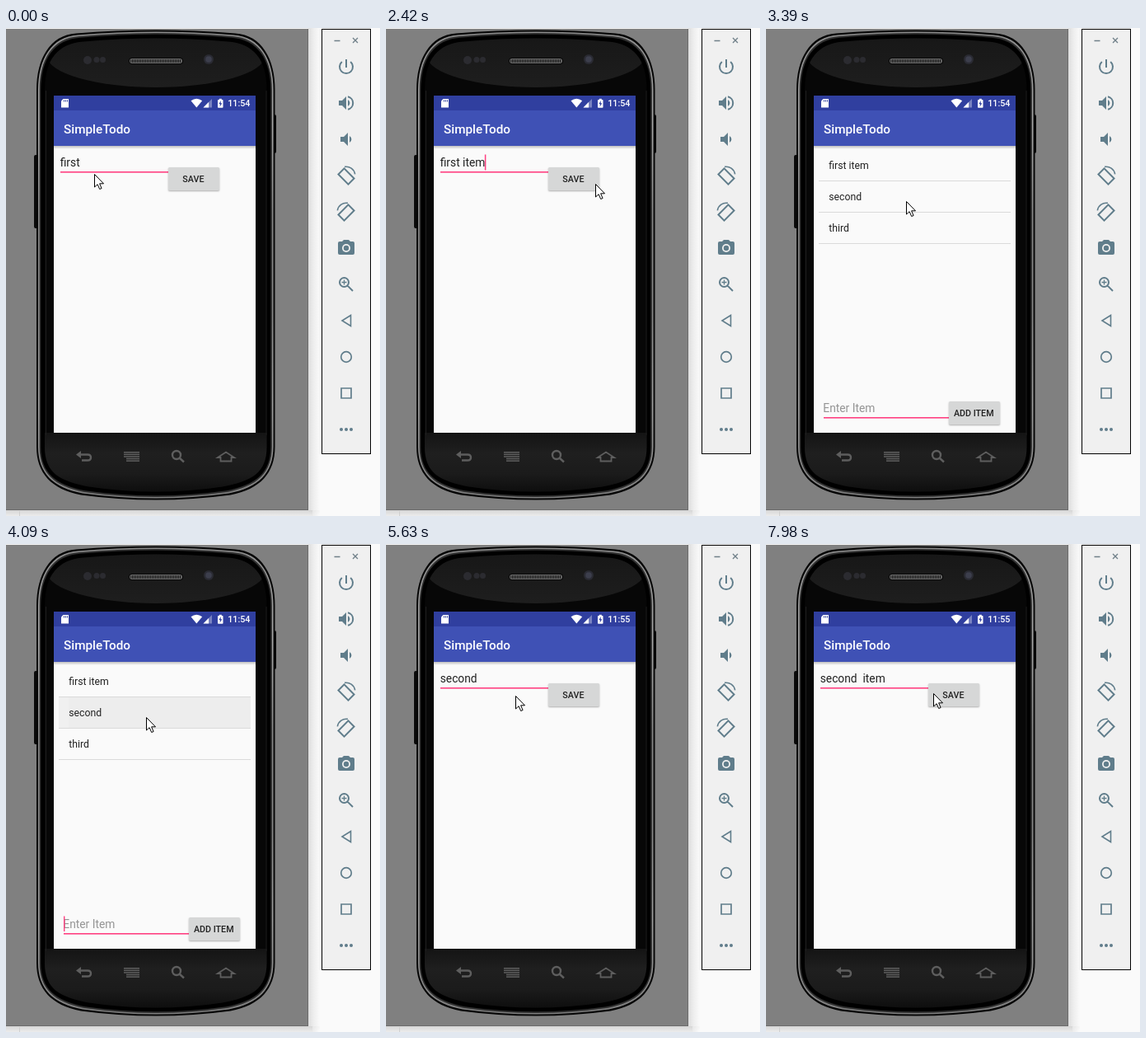
These frames come from a looping animation (454 px wide and 592 px high, 8000 ms). An HTML page with a canvas:

```html
<!DOCTYPE html>
<html lang="en">
<head>
<meta charset="utf-8">
<title>Todo list demo</title>
<style>
html, body { margin: 0; width: 100%; height: 100%; overflow: hidden; background: #fafafa; }
canvas { display: block; width: 454px; height: 592px; }
</style>
</head>
<body>
<canvas id="stage"></canvas>
<script>
const W = 454, H = 592, LOOP = 8000;
const PINK = '#ff4081', INDIGO = '#3f51b5', DEEP = '#303f9f', SLATE = '#607d8b', PAPER = '#fafafa';
const FONT = 'Roboto, "Noto Sans", sans-serif';
const SCREEN = { x: 58, y: 82, w: 245, h: 409 };

const canvas = document.getElementById('stage');
const dpr = window.devicePixelRatio || 1;
canvas.width = W * dpr;
canvas.height = H * dpr;
let c = canvas.getContext('2d');

// Timelines: each entry holds from its time until the next one.
const typed = [[0, 'first '], [1110, 'first i'], [1230, 'first ite'], [1380, 'first item'],
  [4240, 'second  '], [6180, 'second  i'], [6330, 'second  ite'], [6480, 'second  item']];
const editCaret = [[0, 0], [150, 1], [710, 0], [1110, 1], [1910, 0], [2420, 1], [4670, 0],
  [5100, 1], [5630, 0], [6180, 1], [7040, 0], [7590, 1], [7980, 0]];
const listCaret = [[0, 1], [3240, 0], [3820, 1]];
const mouse = [[0, 107, 177], [2180, 150, 180], [2300, 215, 188], [2420, 254, 189],
  [2850, 244, 185], [3240, 206, 198], [3390, 170, 210], [4390, 162, 205], [4820, 157, 184],
  [7470, 166, 184], [7590, 180, 184], [7710, 191, 184], [7860, 199, 182], [7980, 203, 181]];
const scenes = [[0, 'edit'], [2850, 'press'], [2970, 'closing'], [3120, 'list'],
  [4240, 'opening'], [4390, 'edit']];

const at = (list, t) => list.filter(k => k[0] <= t).pop();

function rect(x, y, w, h, fill) {
  c.fillStyle = fill;
  c.fillRect(x, y, w, h);
}
function round(x, y, w, h, r, fill) {
  c.beginPath();
  c.roundRect(x, y, w, h, r);
  c.fillStyle = fill;
  c.fill();
}
function disc(x, y, r, fill) {
  c.beginPath();
  c.arc(x, y, r, 0, Math.PI * 2);
  c.fillStyle = fill;
  c.fill();
}
function poly(points, fill) {
  c.beginPath();
  points.forEach(p => c.lineTo(p[0], p[1]));
  c.closePath();
  if (fill) { c.fillStyle = fill; c.fill(); }
}
function line(path, color, width) {
  c.strokeStyle = color;
  c.lineWidth = width;
  c.stroke(new Path2D(path));
}
function text(s, x, y, size, color, weight = 400) {
  c.font = `${weight} ${size}px ${FONT}`;
  c.fillStyle = color;
  c.fillText(s, x, y);
}
function fade(x0, y0, x1, y1, ...colors) {
  const g = c.createLinearGradient(x0, y0, x1, y1);
  colors.forEach((k, i) => g.addColorStop(i / (colors.length - 1), k));
  return g;
}
function placed(x, y, draw, angle = 0) {
  c.save();
  c.translate(x, y);
  c.rotate(angle);
  draw();
  c.restore();
}

// ---- phone and surroundings ----
function shell(inset, fill) {
  const l = 37 + inset, r = 326.5 - inset, t = 2.5 + inset, b = 572.5 - inset, m = 182;
  const p = new Path2D(`M${l} 75C${l} 38 ${l + 16} ${t + 6} ${l + 48} ${t + 4}
    Q${m} ${t - 4} ${r - 48} ${t + 4}C${r - 16} ${t + 6} ${r} 38 ${r} 75
    V508C${r} 540 ${r - 18} ${b - 13} ${r - 54} ${b - 6}
    Q${m} ${b + 6} ${l + 54} ${b - 6}C${l + 18} ${b - 13} ${l} 540 ${l} 508Z`);
  c.fillStyle = fill;
  c.fill(p);
  return p;
}

function backdrop() {
  rect(0, 0, W, H, PAPER);
  rect(367, 0, 14, 585, fade(367, 0, 381, 0, '#dedede', '#efefef', PAPER));
  rect(0, 585, 372, 7, fade(0, 585, 0, 592, '#d6d6d6', '#ececec'));
  rect(372, 585, 9, 7, fade(372, 585, 381, 590, '#e6e6e6', PAPER));
  rect(16, 586, 1, 6, '#cfcfcf');
  rect(0, 1, 367, 584, '#808080');
  rect(366, 1, 1, 584, '#6c6c6c');
  rect(0, 584, 367, 1, '#6c6c6c');
}

function phone() {
  round(34, 154, 6, 89, 2, '#0a0a0a');
  round(324, 105, 4, 47, 2, '#0a0a0a');
  shell(0, '#050505');
  shell(2, fade(0, 4, 0, 570, '#8a8a8a', '#a8a8a8', '#868686', '#868686', '#9e9e9e', '#7c7c7c'));
  shell(3.6, '#303030');
  shell(5.2, '#000');
  const face = shell(10, '#070707');
  c.save();
  c.clip(face);
  c.beginPath();
  c.ellipse(182, 34, 132, 38, 0, 0, Math.PI * 2);
  c.fillStyle = fade(0, 10, 0, 72, '#171717', '#1e1e1e');
  c.fill();
  rect(40, 491, 290, 80, fade(0, 491, 0, 566, '#141414', '#1f1f1f', '#1b1b1b', '#0c0c0c'));
  c.restore();
  line('M48.5 76V494M316 76V494', '#1d1d1d', 1);

  disc(99, 39, 5, '#2b2b30');
  disc(110, 38.5, 3.5, '#2b2b30');
  disc(117.5, 38.5, 3.5, '#2b2b30');
  disc(246, 38, 6, '#2a2b33');
  disc(246, 38, 3.8, '#3c3e4c');
  round(149, 36, 66, 8, 4, '#060606');
  round(150, 37, 64, 6, 3, '#6c6c6c');
  round(151, 38, 62, 4, 2, '#1a1a1a');
  for (let x = 152; x < 213; x += 2) rect(x, 38, 1, 4, '#606060');

  // hardware keys
  const key = '#5e5e5e';
  line('M88 517.5H99Q103 517.5 103 521T99 524.5H92', key, 2.4);
  poly([[85, 517.5], [91, 513], [91, 522]], key);
  for (let i = 0; i < 5; i++) rect(i < 3 ? 143 : 146, 514 + i * 2.6, i < 3 ? 19 : 16, 1.5, key);
  line('M212 518A5 5 0 1 0 202 518A5 5 0 1 0 212 518M210.5 521.5L216 526.5', key, 2.4);
  line('M257 521L267 514.5L277 521H273.5V525.5H260.5V521Z', key, 1.8);
}

// ---- emulator side panel ----
function speaker(x) {
  poly([[x, -3], [x + 4, -3], [x + 9, -8], [x + 9, 8], [x + 4, 3], [x, 3]], SLATE);
}
function rotation() {
  c.strokeStyle = SLATE;
  c.lineWidth = 2;
  placed(0, 1, () => c.strokeRect(-5, -8.5, 10, 17), -Math.PI / 4);
  c.beginPath();
  c.arc(0, 0, 10.8, -1.75, -0.15);
  c.lineWidth = 1.6;
  c.stroke();
}
const tools = [
  () => line('M0 -9V1M-5.2 -6A8 8 0 1 0 5.2 -6', SLATE, 2),
  () => {
    speaker(-9);
    line('M2 -7.8A8 8 0 0 1 2 7.8', SLATE, 2);
    c.fillStyle = SLATE;
    c.fill(new Path2D('M2 -4A4.5 4.5 0 0 1 2 4Z'));
  },
  () => {
    speaker(-7);
    c.fillStyle = SLATE;
    c.fill(new Path2D('M4 -4A4.5 4.5 0 0 1 4 4Z'));
  },
  rotation,
  () => { c.scale(-1, 1); rotation(); },
  () => {
    round(-10, -8, 20, 16, 2, SLATE);
    poly([[-5, -8], [-3, -10], [3, -10], [5, -8]], SLATE);
    disc(0, 0, 5, '#f0f0f0');
    disc(0, 0, 3.2, SLATE);
  },
  () => {
    line('M3 -2.5A5.5 5.5 0 1 0 -8 -2.5A5.5 5.5 0 1 0 3 -2.5M1.6 1.6L8 8', SLATE, 2);
    line('M-5.5 -2.5H.5M-2.5 -5.5V.5', SLATE, 1.3);
  },
  () => line('M5.5 -6.5V6.5L-5 0Z', SLATE, 1.6),
  () => line('M6.3 0A6.3 6.3 0 1 0 -6.3 0A6.3 6.3 0 1 0 6.3 0', SLATE, 1.7),
  () => line('M-6 -6H6V6H-6Z', SLATE, 1.7),
  () => [-6, 0, 6].forEach(x => disc(x, 0, 2, SLATE))
];

function panel() {
  rect(383, 1, 60, 516, '#000');
  rect(384, 2, 58, 514, '#f0f0f0');
  line('M398.5 15.5H405.5M421 12L427 18M427 12L421 18', '#6f7f88', 1.3);
  tools.forEach((draw, i) => placed(413, 47 + i * 44, draw));
}

// ---- app windows ----
function button(x, y, w, label, lx, pressed) {
  c.save();
  c.shadowColor = 'rgba(0,0,0,.3)';
  c.shadowBlur = 2 * dpr;
  c.shadowOffsetY = dpr;
  round(x, y, w, 28, 1.5, pressed ? '#c6c7c7' : '#d6d7d7');
  c.restore();
  text(label, lx, y + 18, 10.7, '#212121', 500);
}

function chrome() {
  const { x, y, w, h } = SCREEN;
  rect(x, y, w, h, PAPER);
  rect(x, 143, w, 4, fade(0, 143, 0, 147, 'rgba(0,0,0,.24)', 'rgba(0,0,0,0)'));
  rect(x, 100, w, 43, INDIGO);
  rect(x, y, w, 18, DEEP);
  text('SimpleTodo', 70, 127.7, 15.3, '#fff', 500);
}

function editWindow(t, pressed) {
  chrome();
  const s = at(typed, t)[1];
  rect(66, 174, 133, 1.6, PINK);
  text(s, 65.7, 168.3, 13.8, '#212121');
  if (at(editCaret, t)[1]) rect(65.2 + c.measureText(s).width, 153.5, 1.5, 19, PINK);
  button(197, 169, 62, 'SAVE', 214.3, pressed);
}

function listWindow(t) {
  chrome();
  if (t >= 3820) {
    rect(64, 186, 233, 37, '#ededed');
    rect(64, 186, 12, 37, '#f0f0f0');
  }
  ['first item', 'second', 'third'].forEach((s, i) => {
    rect(64, 185 + i * 38, 233, 1, '#dadada');
    text(s, 76.3, 171.3 + i * 37.8, 12.25, '#212121');
  });
  rect(70, 472, 153, 1.6, PINK);
  text('Enter Item', 69.3, 465.6, 13.8, '#949494');
  if (at(listCaret, t)[1]) rect(70, 451.5, 1.4, 18.5, PINK);
  button(222, 453, 62, 'ADD ITEM', 228, false);
}

// A whole window blended as one layer, so its parts do not show through each other.
const layer = document.createElement('canvas');
layer.width = canvas.width;
layer.height = canvas.height;
const layerCtx = layer.getContext('2d');

function ghost(alpha, dy, draw) {
  const main = c;
  c = layerCtx;
  c.setTransform(dpr, 0, 0, dpr, 0, 0);
  c.clearRect(0, 0, W, H);
  draw();
  c = main;
  c.globalAlpha = alpha;
  c.drawImage(layer, 0, dy, W, H);
  c.globalAlpha = 1;
}

function statusBar(t) {
  poly([[69.5, 86], [76, 86], [76, 96.5], [67, 96.5], [67, 88.5]], '#fff');
  [70, 72, 74].forEach(x => rect(x, 87.3, 1, 2.2, DEEP));
  c.fillStyle = '#fff';
  c.fill(new Path2D('M224.5 88.3Q231.3 83.2 238.2 88.3L231.3 96.5Z'));
  poly([[250, 86], [250, 96.5], [239.5, 96.5]], 'rgba(255,255,255,.35)');
  poly([[246, 90], [246, 96.5], [239.5, 96.5]], '#fff');
  round(257, 87, 6.5, 9.8, 0.8, '#fff');
  rect(258.8, 85.8, 3, 2, '#fff');
  poly([[261, 88], [258.3, 92.3], [260, 92.3], [259.6, 95.5], [262.3, 91.2], [260.6, 91.2]], DEEP);
  text(t < 4240 ? '11:54' : '11:55', 269.3, 95.3, 10.7, '#fff', 500);
}

function app(t) {
  const { x, y, w, h } = SCREEN, scene = at(scenes, t)[1];
  c.save();
  c.beginPath();
  c.rect(x, y, w, h);
  c.clip();
  if (scene === 'edit' || scene === 'press') {
    editWindow(t, scene === 'press');
  } else {
    listWindow(t);
    if (scene === 'closing') {
      rect(x, y, w, h, 'rgba(0,0,0,.043)');
      ghost(0.34, 13, () => editWindow(t, true));
    }
    if (scene === 'opening') ghost(0.16, 20, () => editWindow(t, false));
  }
  statusBar(t);
  c.restore();
}

function pointer(t) {
  const [, x, y] = at(mouse, t);
  placed(x + 0.5, y + 0.5, () => {
    poly([[0, 0], [0, 15.5], [3.6, 12.2], [6.2, 18], [8.6, 17], [6.1, 11.3], [11, 11.3]], '#fff');
    c.strokeStyle = '#000';
    c.lineWidth = 1;
    c.stroke();
  });
}

const start = performance.now();
function frame(now) {
  const t = Math.max(0, now - start) % LOOP;
  c.setTransform(dpr, 0, 0, dpr, 0, 0);
  backdrop();
  phone();
  panel();
  app(t);
  pointer(t);
  requestAnimationFrame(frame);
}
frame(start);
</script>
</body>
</html>
```
